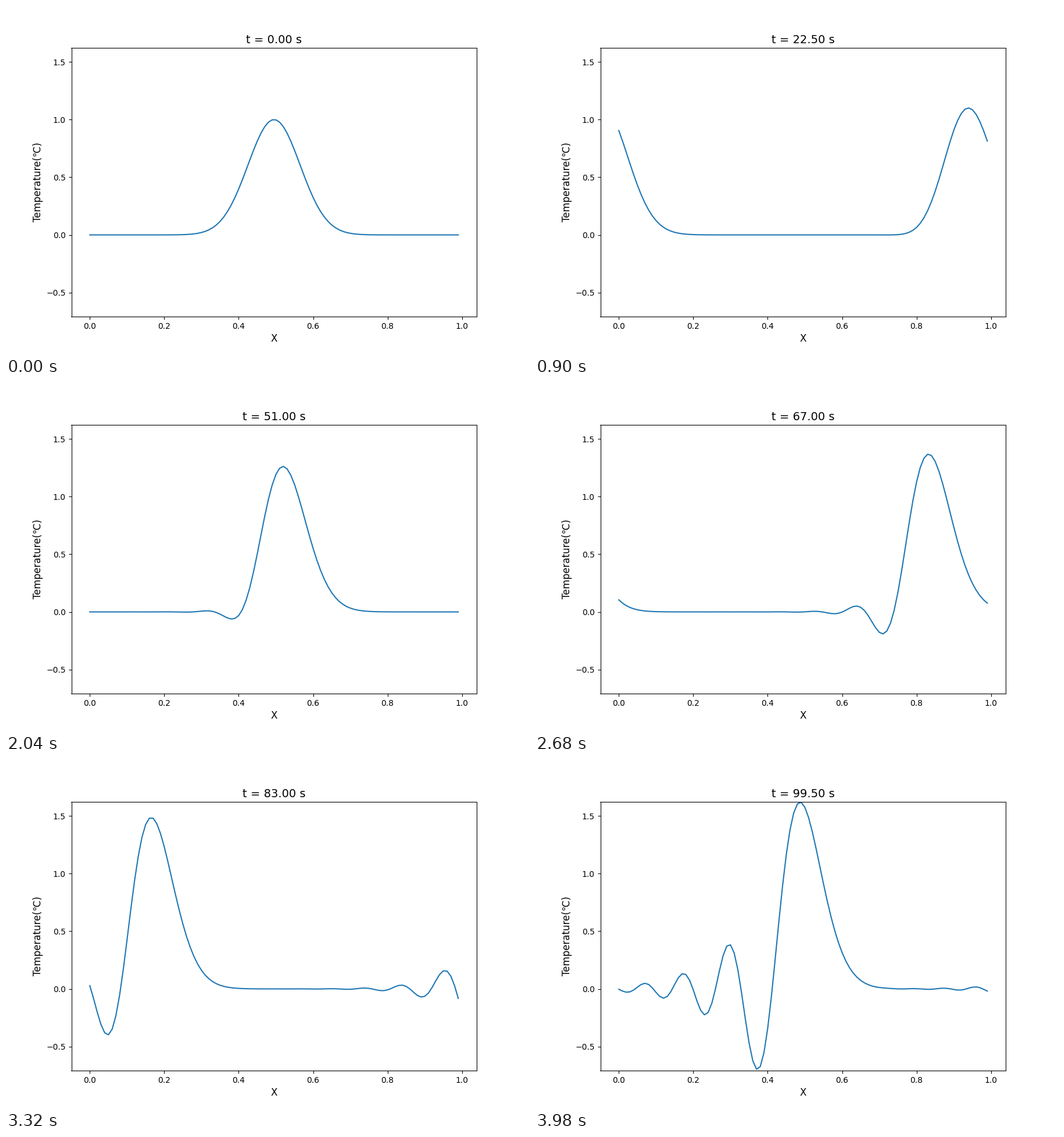
Recreate the animation shown at these times as a matplotlib script. Size 900 by 600 pixels, loop 4000 ms.

```python
import numpy as np
import matplotlib.pyplot as plt
from matplotlib.animation import FuncAnimation

# Advection of a Gaussian pulse: forward in time, centred in space
N = 100
DX = 0.01
DT = 0.1
SPEED = 0.02
SIGMA = 0.07
STEPS = 1000
STRIDE = 5
INTERVAL = 20


def solve(u):
    """Return the profile after every time step."""
    history = [u]
    courant = SPEED * DT / DX
    for _ in range(STEPS):
        new = u.copy()
        new[1:-1] -= courant / 2 * (u[2:] - u[:-2])
        # periodic ghost cells
        new[0], new[-1] = new[-2], new[1]
        history.append(new)
        u = new
    return np.array(history)


x = np.arange(N) * DX
history = solve(np.exp(-0.5 * ((x - x.mean()) / SIGMA) ** 2))

plt.rcParams["font.family"] = "DejaVu Sans"
fig, ax = plt.subplots(figsize=(9, 6), dpi=100)
line, = ax.plot(x, history[0], color="tab:blue", lw=1.5)
ax.set_ylim(history.min(), history.max())
ax.set_xlabel("X", fontsize=12)
ax.set_ylabel("Temperature(℃)", fontsize=12)
title = ax.set_title("", fontsize=14)


def update(frame):
    step = frame * STRIDE
    line.set_ydata(history[step])
    title.set_text(f"t = {step * DT:.2f} s")
    return line, title


anim = FuncAnimation(fig, update, frames=STEPS // STRIDE,
                     interval=INTERVAL, repeat=True, repeat_delay=0)
plt.show()
```
